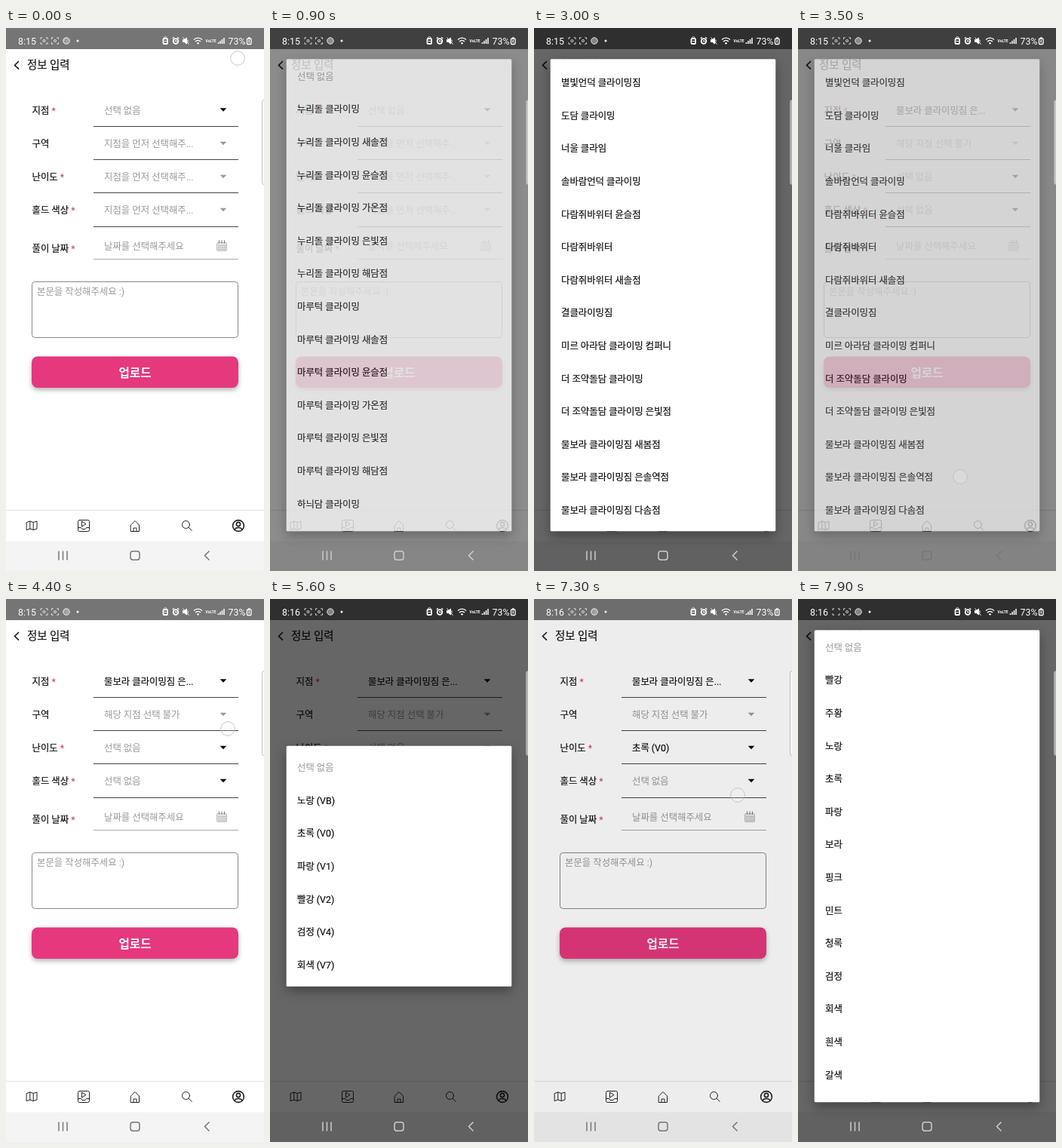
An HTML page that plays this animation: 342x720 px, repeating every 8 s.

```html
<!DOCTYPE html>
<html lang="ko">
<head>
<meta charset="utf-8">
<title>정보 입력</title>
<style>
html, body { margin: 0; width: 100%; height: 100%; overflow: hidden; background: #fff; }
#stage { display: block; width: 100vw; height: 100vh; }
text { font: 12.4px Roboto, "Noto Sans CJK KR", "Noto Sans CJK", sans-serif; fill: #111; stroke: #111; stroke-width: .2; white-space: pre; }
.hint { fill: #9a9a9a; stroke: none; }
.star { fill: #d23c60; stroke: none; }
.light { fill: #fff; stroke: none; }
.line { fill: none; stroke: #222; stroke-linecap: round; stroke-linejoin: round; }
.off { fill: #9a9a9a; }
.sheet { fill: #fff; filter: drop-shadow(0 6px 8px rgba(0, 0, 0, .35)); }

/* One loop is 8 s, so 100 ms is 1.25 %. */
.anim { animation: 8s step-end -20ms infinite; }
.fade { animation: 8s steps(4) -20ms infinite; }

#dim { animation-name: dim; }
@keyframes dim {
  0%, 7.5% { opacity: 0; }
  12.5%, 42.5% { opacity: 1; }
  47.5% { opacity: .12; animation-timing-function: steps(1); }
  48.75%, 58.75% { opacity: 0; }
  63.75%, 86.25% { opacity: 1; }
  91.25% { opacity: .12; animation-timing-function: steps(1); }
  92.5% { opacity: 0; }
  97.5%, 100% { opacity: 1; }
}
#gyms { animation-name: gyms; }
@keyframes gyms {
  0%, 7.5% { opacity: 0; }
  12.5% { opacity: 1; }
  42.5% { opacity: 1; animation-timing-function: steps(2); }
  45% { opacity: .29; animation-timing-function: steps(1); }
  46.25%, 100% { opacity: 0; }
}
#levels { animation-name: levels; }
@keyframes levels {
  0%, 58.75% { opacity: 0; }
  63.75% { opacity: 1; }
  86.25% { opacity: 1; animation-timing-function: steps(2); }
  88.75% { opacity: .29; animation-timing-function: steps(1); }
  90%, 100% { opacity: 0; }
}
#colors { animation-name: colors; }
@keyframes colors {
  0%, 92.5% { opacity: 0; }
  97.5%, 100% { opacity: 1; }
}

/* List scroll offset, shared by the rows and the thumb. */
@property --s { syntax: "<number>"; inherits: true; initial-value: 6; }
#scroll { animation-name: scroll; }
#scroll .rows { transform: translateY(calc(var(--s) * -1px)); }
#thumb { transform: translateY(calc((var(--s) - 6) * .327px)); animation-name: thumb; }
#colors .rows { transform: translateY(-6px); }
@keyframes scroll {
  0% { --s: 6; }
  22.5% { --s: 50; }
  23.75% { --s: 360; }
  25% { --s: 860; }
  26.25% { --s: 1204; }
  27.5% { --s: 1228; }
  28.75% { --s: 1243; }
  30% { --s: 1252; }
  31.25% { --s: 1258; }
  32.5%, 100% { --s: 1262; }
}
@keyframes thumb {
  0% { opacity: 0; }
  22.5% { opacity: 1; }
  33.75% { opacity: 1; animation-timing-function: steps(3); }
  37.5%, 100% { opacity: 0; }
}

/* Form states */
.empty { animation-name: empty; }
.chosen { animation-name: chosen; }
.ungraded { animation-name: ungraded; }
.graded { animation-name: graded; }
.early { animation-name: early; }
.late { animation-name: late; }
@keyframes empty { 0% { opacity: 1; } 43.75%, 100% { opacity: 0; } }
@keyframes chosen { 0% { opacity: 0; } 43.75%, 100% { opacity: 1; } }
@keyframes ungraded { 0% { opacity: 0; } 43.75% { opacity: 1; } 87.5%, 100% { opacity: 0; } }
@keyframes graded { 0% { opacity: 0; } 87.5%, 100% { opacity: 1; } }
@keyframes early { 0% { opacity: 1; } 60%, 100% { opacity: 0; } }
@keyframes late { 0% { opacity: 0; } 60%, 100% { opacity: 1; } }

#keys { animation-name: keys; }
@keyframes keys {
  0% { stroke: #777; }
  11.25% { stroke: #ccc; }
  43.75% { stroke: #777; }
  62.5% { stroke: #ccc; }
  87.5% { stroke: #777; }
  96.25%, 100% { stroke: #ccc; }
}
#blink { animation-name: blink; }
@keyframes blink {
  0% { opacity: 1; }
  35% { opacity: 0; }
  36.25% { opacity: 1; }
  68.75% { opacity: 0; }
  70% { opacity: 1; }
  98.75%, 100% { opacity: 0; }
}

#touch { animation-name: touch; }
@keyframes touch {
  0% { opacity: 1; transform: translate(307px, 40px); }
  1.25% { opacity: 1; transform: translate(304px, 63px); }
  2.5% { opacity: 1; transform: translate(299px, 95px); }
  3.75% { opacity: 1; transform: translate(294.5px, 115px); }
  6.25% { opacity: 0; transform: translate(294.5px, 115px); }
  20% { opacity: 1; transform: translate(224px, 524px); }
  22.5% { opacity: 1; transform: translate(226px, 480px); }
  23.75% { opacity: 1; transform: translate(236px, 320px); }
  25% { opacity: 0; transform: translate(236px, 320px); }
  41.25% { opacity: 1; transform: translate(215px, 595px); }
  46.25% { opacity: 0; transform: translate(215px, 595px); }
  52.5% { opacity: 1; transform: translate(292px, 150px); }
  53.75% { opacity: 1; transform: translate(293px, 160px); }
  55% { opacity: 1; transform: translate(294px, 172px); }
  56.25% { opacity: 1; transform: translate(292px, 186px); }
  57.5% { opacity: 1; transform: translate(291px, 197px); }
  60% { opacity: 0; transform: translate(291px, 197px); }
  81.25% { opacity: 1; transform: translate(218.5px, 313.5px); }
  90% { opacity: 1; transform: translate(242px, 292px); }
  91.25% { opacity: 1; transform: translate(270px, 260px); }
  92.5% { opacity: 1; transform: translate(288px, 242px); }
  93.75%, 100% { opacity: 0; transform: translate(288px, 242px); }
}
</style>
</head>
<body>
<svg id="stage" viewBox="0 0 342 720">
  <defs>
    <path id="arrow" d="M-4.3-2.2h8.6L0 2.2z"/>
    <path id="corners" d="M-4.5-2v-2.2h2.2M2.3-4.2h2.2V-2M4.5 2v2.2H2.3M-2.3 4.2h-2.2V2"/>
  </defs>

  <rect width="342" height="720" fill="#fff"/>
  <rect width="342" height="28" fill="#757575"/>

  <path class="line" d="M16.5 44.5l-5 4.8 5 4.8" stroke-width="1.7"/>
  <text x="28" y="53.6" style="font-size:14.4px">정보 입력</text>

  <g id="labels"></g>
  <path d="M116 130.5h192M116 174.5h192M116 218.5h192M116 263.5h192" stroke="#444"/>
  <path d="M116 306.5h192" stroke="#aaa"/>

  <g class="anim empty">
    <text class="hint" x="130" y="113.5">선택 없음</text>
    <text class="hint" x="130" y="157.5">지점을 먼저 선택해주...</text>
    <text class="hint" x="130" y="202">지점을 먼저 선택해주...</text>
    <text class="hint" x="130" y="246">지점을 먼저 선택해주...</text>
    <use href="#arrow" class="off" x="288" y="197"/>
    <use href="#arrow" class="off" x="288" y="241"/>
  </g>
  <g class="anim chosen">
    <text x="130" y="113.5">물보라 클라이밍짐 은...</text>
    <text class="hint" x="130" y="157.5">해당 지점 선택 불가</text>
    <text class="hint" x="130" y="246">선택 없음</text>
    <use href="#arrow" x="288" y="197"/>
    <use href="#arrow" x="288" y="241"/>
  </g>
  <text class="hint anim ungraded" x="130" y="202">선택 없음</text>
  <text class="anim graded" x="130" y="202">초록 (V0)</text>
  <use href="#arrow" x="288" y="108.5"/>
  <use href="#arrow" class="off" x="288" y="153"/>

  <text class="hint" x="130" y="293.7">날짜를 선택해주세요</text>
  <g fill="none" stroke="#999">
    <rect x="279.5" y="284.5" width="13" height="11" rx="1.5" fill="#e4e4e4" stroke="#bbb"/>
    <path d="M282.5 281.5v4M286 281.5v4M289.5 281.5v4" stroke="#777"/>
    <path d="M281.5 288.5h10M281.5 291h10M281.5 293.5h10" stroke-dasharray="1.5 1.2"/>
  </g>

  <rect x="34.5" y="336.5" width="273" height="74" rx="4" fill="#fff" stroke="#888"/>
  <text class="hint" x="41" y="354">본문을 작성해주세요 :)</text>

  <rect x="34" y="435.5" width="274" height="41.5" rx="8" fill="#e5387d"
    style="filter:drop-shadow(0 3px 3px rgba(0,0,0,.3))"/>
  <text class="light" x="171" y="462.5" text-anchor="middle" style="font-size:15.6px;font-weight:700">업로드</text>

  <path d="M0 639.5h342" stroke="#e2e2e2"/>
  <g class="line">
    <path d="M27.5 655.5l4.3-1.5 4.4 1.5 4.8-1.5v10l-4.8 1.5-4.4-1.5-4.3 1.5zM31.8 654v10M36.2 655.5v10"/>
    <rect x="95.5" y="652.5" width="15" height="15" rx="2"/>
    <path d="M100.5 654.5v6.5l5.2-3.2zM95.5 662.5h4l1.5 2h4l1.5-2h4"/>
    <path d="M165.5 659l5.5-5.5 5.5 5.5v8.5h-11zM169 667.5v-4.5h4v4.5"/>
    <circle cx="238.5" cy="658.5" r="5"/>
    <path d="M242.2 662.3l4 4"/>
    <g stroke-width="1.6">
      <circle cx="308" cy="660" r="7.4"/>
      <circle cx="308" cy="658" r="2.6"/>
      <path d="M303 665c1.5-3.3 8.5-3.3 10 0"/>
    </g>
  </g>
  <rect y="680.5" width="342" height="39.5" fill="#f4f4f4"/>

  <rect id="dim" class="fade" width="342" height="720" fill="#000" fill-opacity=".6"/>

  <g id="gyms" class="fade">
    <rect class="sheet" x="21.7" y="41.2" width="298.6" height="626" rx="1.5"/>
    <g id="scroll" class="anim">
      <svg x="22" y="41.5" width="298" height="625.5"><g class="rows"></g></svg>
      <rect id="thumb" class="anim" x="316.5" y="42" width="3.5" height="209" fill="#a9a9a9"/>
    </g>
  </g>
  <g id="levels" class="fade">
    <rect class="sheet" x="21.7" y="194.8" width="298.6" height="319" rx="1.5"/>
    <svg x="22" y="195" width="298" height="318.5"><g class="rows"></g></svg>
  </g>
  <g id="colors" class="fade">
    <rect class="sheet" x="21.7" y="41.2" width="298.6" height="626" rx="1.5"/>
    <svg x="22" y="41.5" width="298" height="625.5"><g class="rows"></g></svg>
  </g>

  <!-- System bars -->
  <g id="keys" class="anim" fill="none" stroke-width="1.5">
    <path d="M70 693.5v12M75.5 693.5v12M81 693.5v12"/>
    <rect x="165" y="693.7" width="12" height="11.6" rx="3.2"/>
    <path d="M269.5 693.5l-6 6 6 6"/>
  </g>
  <rect x="339.5" y="95.5" width="8" height="112" rx="2.5" fill="#fff" fill-opacity=".5" stroke="#aaa" stroke-opacity=".7"/>

  <g fill="none" stroke="#fff">
    <g opacity=".8">
      <g transform="translate(50.5 17)">
        <use href="#corners"/><circle id="blink" class="anim" r="1.5"/>
      </g>
      <g transform="translate(65 17)"><use href="#corners"/><circle r="1.5"/></g>
      <circle cx="80" cy="17" r="4.3" fill="#fff" fill-opacity=".55"/>
    </g>
    <path d="M77.5 19c0-5 5-5 5 0M79.5 20v-3" stroke="#777" stroke-width=".7"/>
    <rect x="208.5" y="14" width="5.5" height="7" rx="1" stroke-width="1.8"/>
    <path d="M209.5 13.5c0-2.5 3.5-2.5 3.5 0M210 17.5h2.5"/>
    <circle cx="225" cy="17.5" r="3.3" stroke-width="1.8"/>
    <path d="M220.8 14l2-1.7M229.2 14l-2-1.7M225 16v1.7h1.5" stroke-width="1.3"/>
    <path d="M234.5 15.5h2l3-2.5v8l-3-2.5h-2z" fill="#fff"/>
    <path d="M234.5 12.5l8 9M241 15.5v3"/>
    <path d="M249 15.5c3-3.2 8-3.2 11 0M251 18c2-2 5-2 7 0" stroke-width="1.3"/>
    <path d="M281.5 21v-2M284 21v-4M286.5 21v-6M289 21v-8" stroke-width="1.5"/>
    <rect x="319.5" y="14" width="5.5" height="7.5" rx="1" stroke-width="1.3"/>
    <path d="M321 13h2.5M322.2 15.5v4" stroke-width="1.3"/>
  </g>
  <circle cx="254.5" cy="20.2" r="1.2" fill="#fff"/>
  <circle cx="95" cy="17" r="1.5" fill="#fff"/>
  <text class="light anim early" x="16" y="21.5">8:15</text>
  <text class="light anim late" x="16" y="21.5">8:16</text>
  <text class="light" x="264.5" y="18.8" style="font-size:5px;font-weight:700">VoLTE</text>
  <text class="light" x="294.5" y="21.5">73%</text>

  <circle id="touch" class="anim" r="9.3" fill="#fff" fill-opacity=".15" stroke="#bdbdbd" stroke-opacity=".85"/>
</svg>

<script>
const NONE = '선택 없음', PITCH = 43.6;
const $ = sel => document.querySelector(sel);

const labels = [['지점', 109, 1], ['구역', 153, 0], ['난이도', 197.5, 1], ['홀드 색상', 241.5, 1], ['풀이 날짜', 292, 1]];
$('#labels').innerHTML = labels.map(([name, y, must]) =>
  `<text x="34.5" y="${y + 4.5}">${name}${must ? ' <tspan class="star">*</tspan>' : ''}</text>`).join('');

function fill(id, names) {
  $(id + ' .rows').innerHTML = names.map((name, i) =>
    `<text x="14" y="${(33.2 + i * PITCH).toFixed(1)}"${name === NONE ? ' class="hint"' : ''}>${name}</text>`).join('');
}

// Upper part of the gym list: stems combined with branches.
const stems = ['누리돌', '마루턱', '하늬담', '보슬바위', '달무리터'];
const branches = ['', ' 새솔점', ' 윤슬점', ' 가온점', ' 은빛점', ' 해담점'];
const upper = stems.flatMap(s => branches.map(b => `${s} 클라이밍${b}`)).slice(0, 26);

fill('#gyms', [NONE, ...upper,
  '두루202 클라이밍 해오름점', '나래클라이밍짐', '별빛언덕 클라이밍짐', '도담 클라이밍', '너울 클라임',
  '솔바람언덕 클라이밍', '다람쥐바위터 윤슬점', '다람쥐바위터', '다람쥐바위터 새솔점', '결클라이밍짐',
  '미르 아라담 클라이밍 컴퍼니', '더 조약돌담 클라이밍', '더 조약돌담 클라이밍 은빛점',
  '물보라 클라이밍짐 새봄점', '물보라 클라이밍짐 은솔역점', '물보라 클라이밍짐 다솜점']);
fill('#levels', [NONE, '노랑 (VB)', '초록 (V0)', '파랑 (V1)', '빨강 (V2)', '검정 (V4)', '회색 (V7)']);
fill('#colors', [NONE, ...'빨강 주황 노랑 초록 파랑 보라 핑크 민트 청록 검정 회색 흰색 갈색 기타'.split(' ')]);
</script>
</body>
</html>
```
